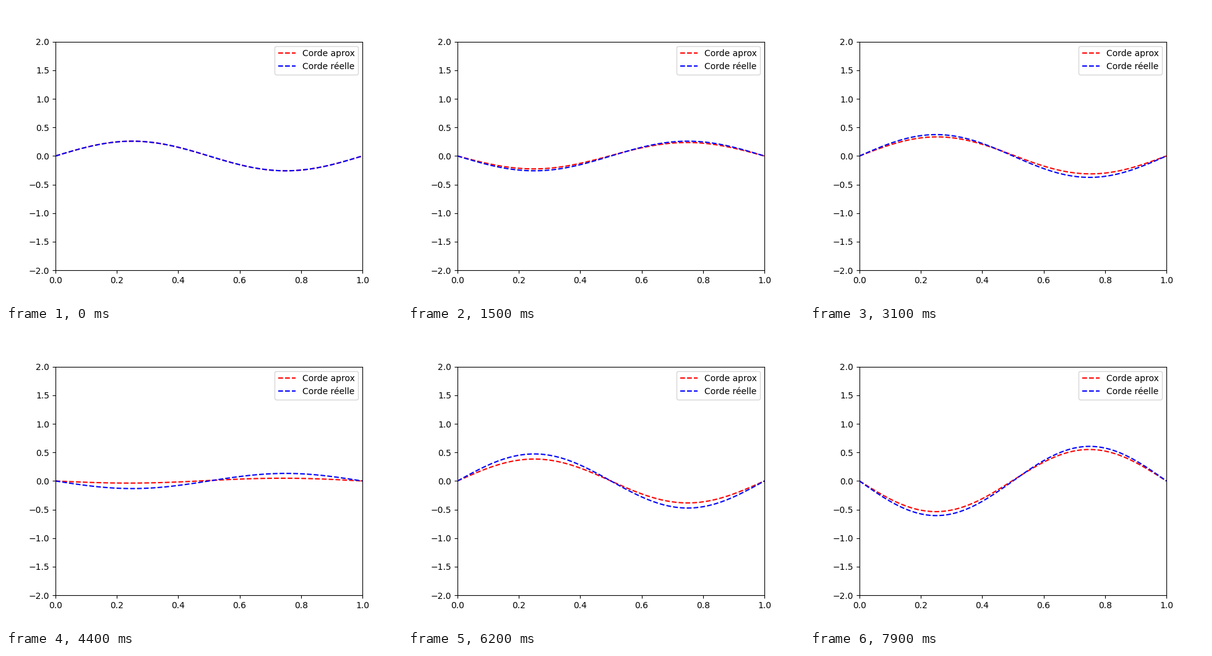
Recreate the animation shown at these times as a matplotlib script. Size 640 by 480 pixels, loop 8000 ms.

```python
import numpy as np
import matplotlib.pyplot as plt
from matplotlib.animation import FuncAnimation

FRAMES = 80
AMP = 2 / np.pi
START = np.radians(66)
STEP = np.radians(12)            # exact phase advance per frame
STEP_APPROX = np.radians(11.82)  # the approximation runs slightly slow

x = np.linspace(0, 1, 101)
mode1, mode2 = np.sin(np.pi * x), np.sin(2 * np.pi * x)

fig, ax = plt.subplots(figsize=(6.4, 4.8), dpi=100)
ax.set_xlim(0, 1)
ax.set_ylim(-2, 2)
approx, = ax.plot([], [], "r--", label="Corde aprox")
real, = ax.plot([], [], "b--", label="Corde réelle")
ax.legend(loc="upper right")


def swing(n, step):
    """Free vibration with a fixed starting position and velocity."""
    return AMP * (np.cos(START) * np.cos(step * n)
                  + STEP / step * np.sin(START) * np.sin(step * n))


def update(n):
    drift = 0.0075 * (1 - np.cos(STEP / 2 * n))
    approx.set_data(x, swing(n, STEP_APPROX) * mode2 + drift * mode1)
    real.set_data(x, swing(n, STEP) * mode2)
    return approx, real


anim = FuncAnimation(fig, update, frames=FRAMES, interval=100,
                     repeat=True, repeat_delay=0)
plt.show()
```
